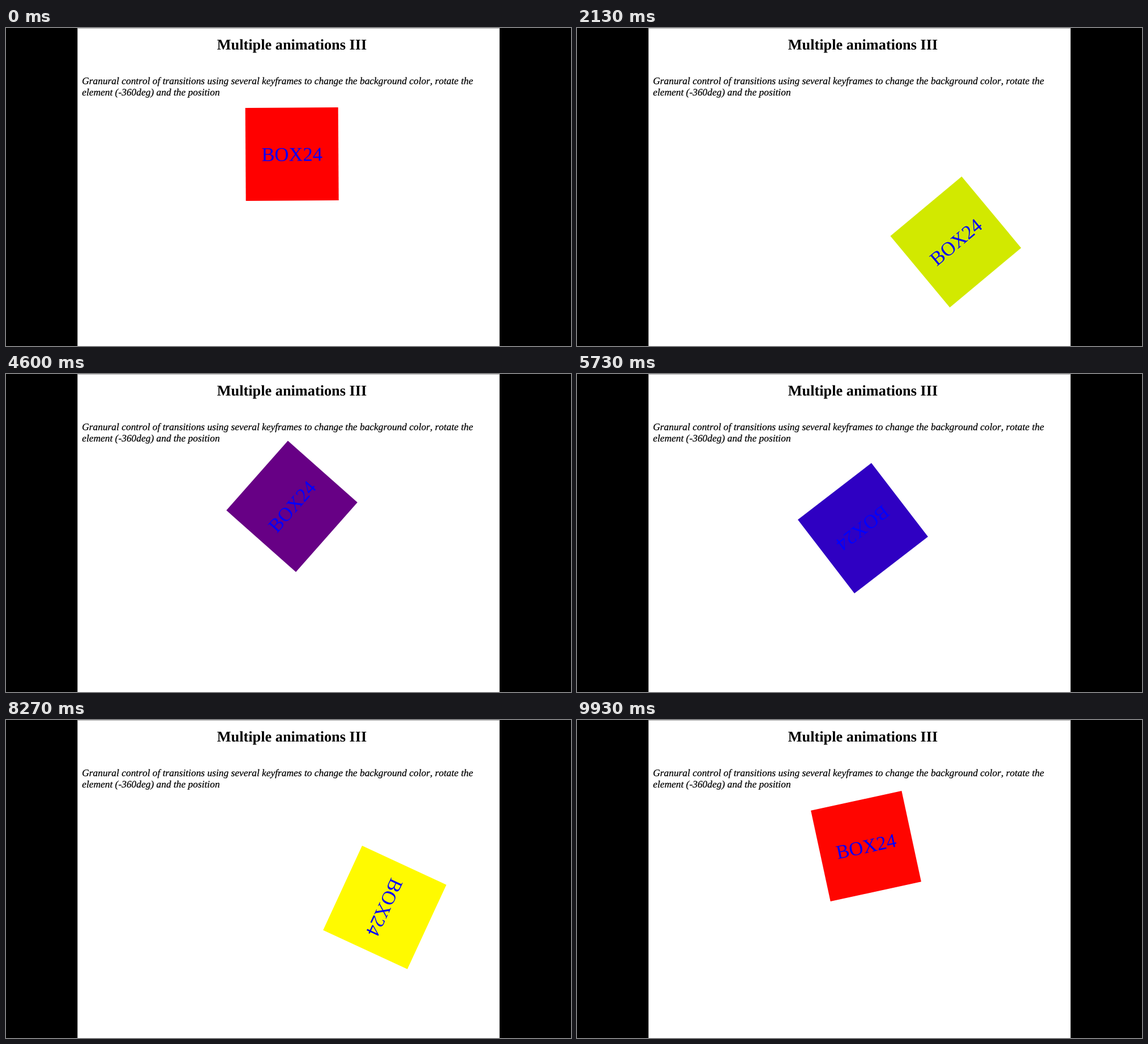
Write an HTML page that moves like this. It is 998 px wide and 561 px high and loops after 10000 ms.

```html
<!DOCTYPE html>
<html lang="en">
<head>
<meta charset="utf-8">
<title>Multiple animations III</title>
<style>
  html, body { margin: 0; width: 100%; height: 100%; overflow: hidden; background: #000; }
  svg { display: block; width: 998px; height: 561px; }
  text { font-family: "Liberation Serif", "Times New Roman", serif; text-rendering: geometricPrecision; }
  .title { font-size: 26.3px; font-weight: bold; text-anchor: middle; }
  .note { font-size: 17.4px; font-style: italic; font-kerning: none; stroke: #000; stroke-width: 0.25px; }
  .label { font-size: 34.5px; fill: #00f; text-anchor: middle; }
</style>
</head>
<body>
<svg viewBox="0 0 998 561">
  <rect width="998" height="561" fill="#000"/>
  <rect x="126.3" width="745.5" height="561" fill="#fff"/>
  <rect x="126.3" width="745.5" height="1" fill="#aaa"/>
  <text class="title" x="505" y="38">Multiple animations III</text>
  <text class="note" x="134.2" y="99">Granural control of transitions using several keyframes to change the background color, rotate the</text>
  <text class="note" x="134.2" y="118.8">element (-360deg) and the position</text>
  <g id="box">
    <rect id="face" x="-82" y="-82" width="164" height="164"/>
    <text class="label" x="0" y="12">BOX24</text>
  </g>
</svg>
<script>
const HALF = 5000, LOOP = 2 * HALF, STEP = 1000 / 15, PHASE = 3;
const SIZE = 164, HOME = [505, 222.5];

// Evenly spaced keyframes, eased within each interval
const corners = [[0, 0], [1, 0], [1, 1], [0, 1], [0, 0]];
const angles = [[0], [-360], [360], [-360], [360]];
const colors = [
  [255, 0, 0], [255, 165, 0], [255, 255, 0],
  [0, 128, 0], [0, 0, 255], [128, 0, 128]
];

const box = document.getElementById("box");
const face = document.getElementById("face");

// cubic-bezier(.25, .1, .25, 1)
function ease(x) {
  let lo = 0, hi = 1;
  for (let i = 0; i < 30; i++) {
    const s = (lo + hi) / 2;
    if (0.75 * s * (1 - s) + s ** 3 < x) lo = s; else hi = s;
  }
  const s = (lo + hi) / 2, r = 1 - s;
  return 0.3 * s * r * r + 3 * s * s * r + s ** 3;
}

function sample(keys, p) {
  const pos = p * (keys.length - 1);
  const i = Math.min(Math.floor(pos), keys.length - 2);
  const k = ease(pos - i);
  return keys[i].map((v, n) => v + (keys[i + 1][n] - v) * k);
}

// Slightly deeper mid-tones
const tone = v => Math.round(255 * (v / 255) ** 1.12);

function render(ms) {
  const tick = Math.floor((ms + 5) / STEP);
  const t = (tick * STEP + PHASE) % LOOP;
  const p = (t < HALF ? t : LOOP - t) / HALF;
  const [x, y] = sample(corners, p).map((v, n) => HOME[n] + v * SIZE);
  const [angle] = sample(angles, p);
  box.setAttribute("transform", `translate(${x} ${y}) rotate(${angle})`);
  face.setAttribute("fill", `rgb(${sample(colors, p).map(tone)})`);
}

const start = performance.now();
function loop(now) {
  render(Math.max(0, now - start));
  requestAnimationFrame(loop);
}
render(0);
requestAnimationFrame(loop);
</script>
</body>
</html>
```
